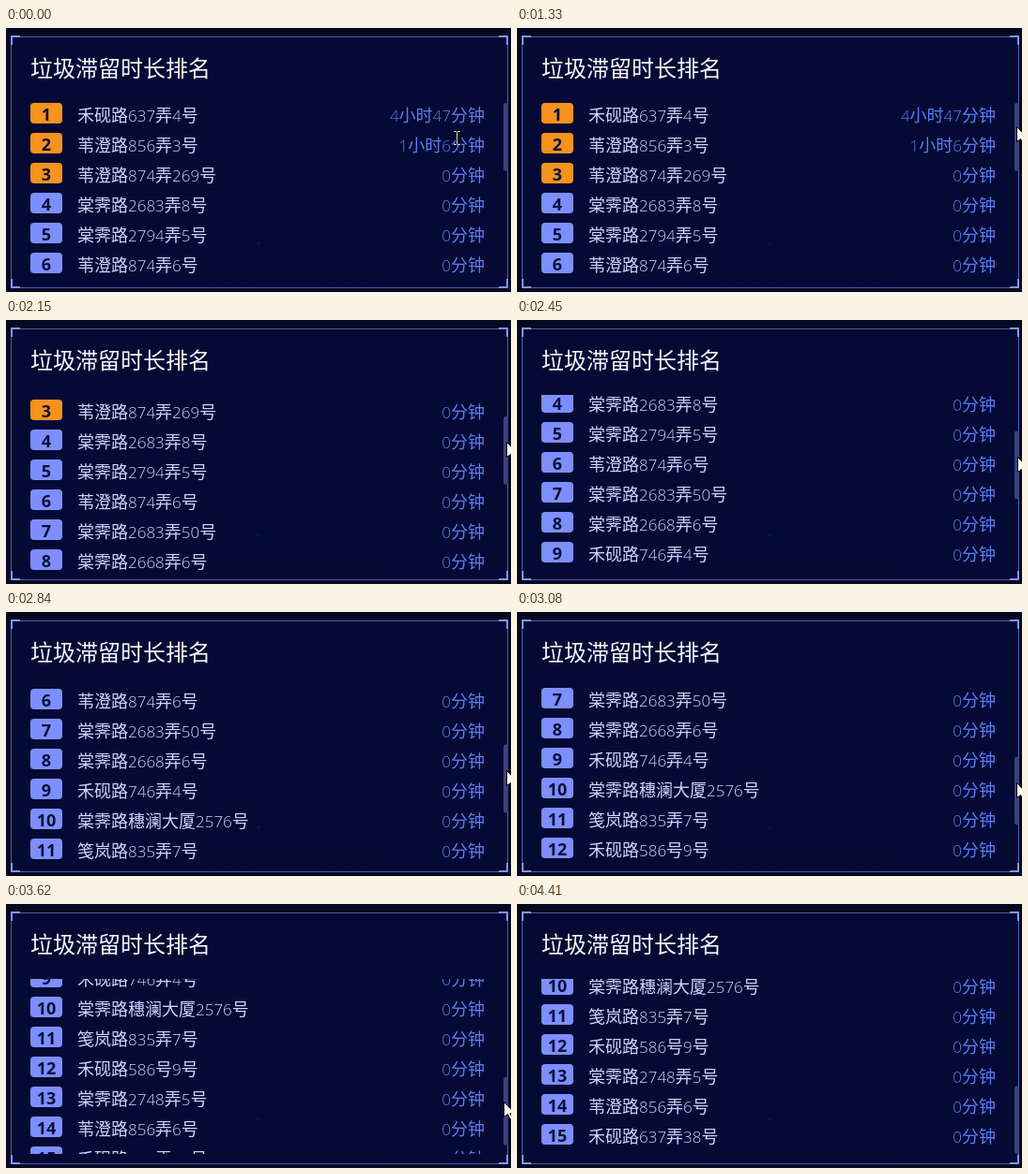
Recreate the animation shown at these times as an HTML page with a canvas. Size 538x282 px, loop 4700 ms.

```html
<!DOCTYPE html>
<html lang="zh-CN">
<head>
<meta charset="utf-8">
<style>
  html, body { margin: 0; width: 100%; height: 100%; overflow: hidden; background: #040820; }
  canvas { display: block; }
</style>
</head>
<body>
<canvas id="stage" width="538" height="282"></canvas>
<script>
const ctx = document.getElementById('stage').getContext('2d');
const LOOP = 4700;
const VIEW = { top: 80, height: 187 };
const PITCH = 32;
const CJK = '"Noto Sans CJK SC", "Noto Sans CJK", sans-serif';
const LATIN = '"Open Sans", "Noto Sans", sans-serif';

const places = [
  '禾砚路637弄4号', '苇澄路856弄3号', '苇澄路874弄269号',
  '棠霁路2683弄8号', '棠霁路2794弄5号', '苇澄路874弄6号',
  '棠霁路2683弄50号', '棠霁路2668弄6号', '禾砚路746弄4号',
  '棠霁路穗澜大厦2576号', '笺岚路835弄7号', '禾砚路586号9号',
  '棠霁路2748弄5号', '苇澄路856弄6号', '禾砚路637弄38号'
];
const durations = ['4小时47分钟', '1小时6分钟'];
const contentHeight = places.length * PITCH;
const maxScroll = contentHeight - VIEW.height;

// start time, pointer x, pointer y, list scroll
const steps = [
  [0, 480, 117, 0], [150, 523, 114, 0], [300, 528, 112, 0],
  [700, 530, 111, 0], [820, 531, 111, 0],
  [1090, 532, 109, 0], [1210, 532, 107, 0], [1330, 532, 105, 0],
  [1730, 532, 107, 5], [1880, 533, 116, 23], [2000, 533, 122, 39],
  [2150, 533, 130, 59], [2300, 533, 138, 79], [2450, 533, 146, 99],
  [2570, 533, 153, 117], [2720, 533, 162, 140], [2840, 533, 169, 158],
  [2960, 532, 175, 175], [3080, 532, 182, 191], [3230, 531, 189, 212],
  [3380, 530, 197, 233], [3500, 530, 204, 251], [3620, 530, 211, 269],
  [3740, 530, 217, 284], [3860, 530, 232, maxScroll],
  [4010, 530, 237, maxScroll], [4260, 516, 273, maxScroll],
  [4410, -50, -50, maxScroll]
];

function rect(x, y, w, h, color) {
  ctx.fillStyle = color;
  ctx.fillRect(x, y, w, h);
}

function roundRect(x, y, w, h, r, color) {
  ctx.fillStyle = color;
  ctx.beginPath();
  ctx.roundRect(x, y, w, h, r);
  ctx.fill();
}

// Digits and Chinese characters are set in separate fonts.
function drawMixed(text, x, y, color, alignRight) {
  const runs = text.match(/\d+|\D+/g).map(run => {
    const font = /\d/.test(run) ? `300 17px ${LATIN}` : `300 18px ${CJK}`;
    ctx.font = font;
    return { run, font, width: ctx.measureText(run).width };
  });
  if (alignRight) x -= runs.reduce((sum, r) => sum + r.width, 0);
  ctx.fillStyle = color;
  ctx.textAlign = 'left';
  for (const { run, font, width } of runs) {
    ctx.font = font;
    ctx.fillText(run, x, y);
    x += width;
  }
}

function drawPanel() {
  rect(0, 0, 538, 282, '#040820');
  rect(5, 9, 530, 269, '#040a33');
  ctx.fillStyle = '#071060';
  ctx.beginPath();
  ctx.arc(269, 230, 2, 0, Math.PI * 2);
  ctx.fill();
  for (let x = 208; x < 390; x += 9) rect(x, 268 + x % 2, 5, 1, '#03071f');

  ctx.strokeStyle = '#4a5db8';
  ctx.lineWidth = 1;
  ctx.strokeRect(5.5, 9.5, 529, 268);
  for (const right of [0, 1]) for (const bottom of [0, 1]) {
    rect(right ? 525 : 5, bottom ? 276 : 8, 10, 2, '#8295ff');
    rect(right ? 533 : 5, bottom ? 268 : 8, 2, 10, '#8295ff');
  }

  ctx.font = `300 24px ${CJK}`;
  ctx.textAlign = 'left';
  ctx.fillStyle = '#f4f6ff';
  ctx.fillText('垃圾滞留时长排名', 26, 52);
}

function drawList(scroll) {
  ctx.save();
  ctx.beginPath();
  ctx.rect(0, VIEW.top, 538, VIEW.height);
  ctx.clip();
  places.forEach((place, i) => {
    const y = VIEW.top + i * PITCH - scroll;
    if (y < VIEW.top - PITCH || y > VIEW.top + VIEW.height) return;
    roundRect(26, y, 34, 22, 4, i < 3 ? '#f6921e' : '#7d8fff');
    ctx.font = `700 18px ${LATIN}`;
    ctx.textAlign = 'center';
    ctx.fillStyle = '#0a1038';
    ctx.fillText(i + 1, 43, y + 18.5);
    drawMixed(place, 76, y + 20, '#cdd4ff');
    drawMixed(durations[i] || '0分钟', 510, y + 20, '#5b7cf5', true);
  });
  ctx.restore();

  const thumbTop = VIEW.top + scroll * VIEW.height / contentHeight;
  roundRect(530, thumbTop, 5, VIEW.height ** 2 / contentHeight, 2.5, '#3a427e');
}

function drawBeam(x, y) {
  const bars = [[-3, -7, 3, 1], [1, -7, 3, 1], [0, -6, 1, 13], [-3, 7, 3, 1], [1, 7, 3, 1]];
  for (const [dx, dy, w, h] of bars) rect(x + dx - 1, y + dy, w + 2, h, '#05060f');
  for (const [dx, dy, w, h] of bars) rect(x + dx, y + dy, w, h, '#d8d8d0');
}

function drawArrow(x, y) {
  const shape = [[0, 0], [0, 16], [4, 13], [6.5, 18.5], [9, 17.5], [6.5, 12], [11.5, 12]];
  ctx.beginPath();
  for (const [dx, dy] of shape) ctx.lineTo(x + 0.5 + dx, y + 0.5 + dy);
  ctx.closePath();
  ctx.fillStyle = '#fff';
  ctx.fill();
  ctx.strokeStyle = '#000';
  ctx.lineWidth = 1;
  ctx.stroke();
}

function frame(now) {
  const time = now % LOOP;
  const [start, x, y, scroll] = steps.findLast(step => step[0] <= time) || steps[0];
  drawPanel();
  drawList(scroll);
  (start === 0 ? drawBeam : drawArrow)(x, y);
  requestAnimationFrame(() => frame(performance.now()));
}
frame(performance.now());
</script>
</body>
</html>
```
